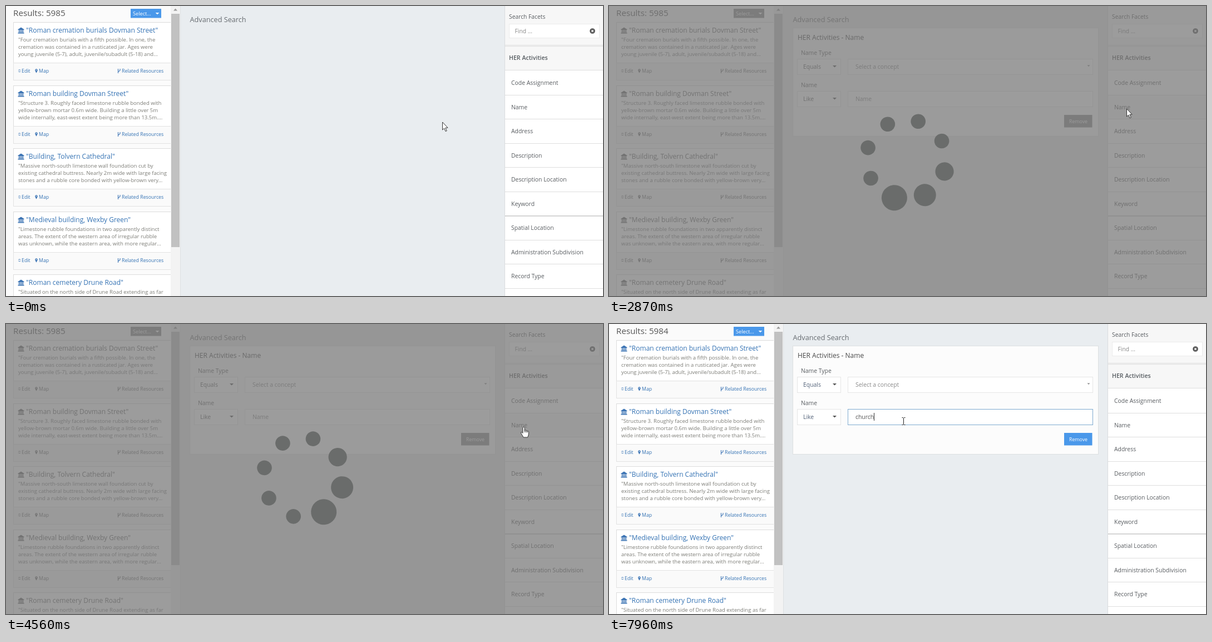
Animation of 1073 by 522 pixels, one loop 8 s. Source, as an HTML page:

```html
<!DOCTYPE html>
<html lang="en">
<head>
<meta charset="utf-8">
<title>Advanced search</title>
<style>
  html, body { margin: 0; width: 100%; height: 100%; overflow: hidden; }
  svg { display: block; width: 100%; height: 100%; font-family: "Open Sans", sans-serif; }
  text { white-space: pre; }
  .loading { filter: grayscale(1); }
</style>
</head>
<body>
<svg id="stage" viewBox="0 0 1073 522">
  <defs>
    <g id="museum" fill="#3c74b4">
      <path d="M0 3.6 5.5 0 11 3.6V4.4H0ZM0 9.4H11V11H0ZM.8 8.1H10.2V9H.8Z"/>
      <path d="M1.4 4.4H3.2V8.2H1.4ZM4.6 4.4H6.4V8.2H4.6ZM7.8 4.4H9.6V8.2H7.8Z"/>
    </g>
    <g id="links" fill="none" stroke="#3c74b4">
      <path d="M3.4 3V2H1.5Q.5 2 .5 3M.5 4.5Q.5 5.5 1.5 5.5H3.4V4.5" stroke-width=".9"/>
      <path d="M32.5 7.2 30.7 3.4A2 2 0 1 1 34.3 3.4Z" fill="#3c74b4" stroke-width=".6"/>
      <circle cx="32.5" cy="2.4" r=".8" fill="#fff" stroke="none"/>
      <path d="M179.5 0V8M183 0V2Q183 4 179.5 5" stroke-width="1.1"/>
    </g>
    <path id="arrow" d="M0 0V14L3.2 11.1 5.5 16.6 7.7 15.7 5.4 10.2H9.6Z"
      fill="#fff" stroke="#222" stroke-width=".9"/>
    <g id="hand" stroke="#222" stroke-width=".9">
      <path fill="#fff" d="M-1.6 1.5Q0-.6 1.6 1.5V6.4Q3.2 5.4 4 7 5.6 6.2 6.4 7.8 8.5 7.2 8.8 9.2V13Q8.5 16 7 19H-.5Q-2 16-4.8 11.6-5.5 9-3.2 9.8L-1.6 11.5Z"/>
      <path d="M1.6 6V10M4 7V10.2M6.4 8V10.6"/>
    </g>
    <path id="ibeam" d="M-3-6.5H-1L0-5.5 1-6.5H3M0-5.5V5.5M-3 6.5H-1L0 5.5 1 6.5H3" fill="none" stroke="#222"/>
  </defs>
  <g id="page"></g>
  <g id="mask">
    <rect width="1073" height="522" fill="#777" opacity=".72"/>
    <g id="spinner" fill="#6a6c6b"></g>
  </g>
  <use id="cursor"/>
</svg>
<script>
const $ = id => document.getElementById(id);
const clamp = v => Math.max(0, Math.min(1, v));
const BLUE = '#3573b4', GREY = '#595d61';

const text = (x, y, size, content, fill = GREY, extra = '') =>
  `<text x="${x}" y="${y}" font-size="${size}" fill="${fill}" ${extra}>${content}</text>`;
const rect = (x, y, w, h, fill, extra = '') =>
  `<rect x="${x}" y="${y}" width="${w}" height="${h}" fill="${fill}" ${extra}/>`;
const box = (x, y, w, h, fill, stroke, extra = '') =>
  rect(x + .5, y + .5, w, h, fill, `stroke="${stroke}" ${extra}`);
const caretDown = (x, y, r, fill) =>
  `<path d="M${x - r} ${y}h${2 * r}l${-r} ${r}Z" fill="${fill}"/>`;

const results = [
  ['Roman cremation burials Dovman Street',
    '"Four cremation burials with a fifth possible. In one, the',
    'cremation was contained in a rusticated jar. Ages were',
    'young juvenile (5-7), adult, juvenile/subadult (5-18) and...'],
  ['Roman building Dovman Street',
    '"Structure 3. Roughly faced limestone rubble bonded with',
    'yellow-brown mortar 0.6m wide. Building a little over 5m',
    'wide internally, east-west extent being more than 13.5m....'],
  ['Building, Tolvern Cathedral',
    '"Massive north-south limestone wall foundation cut by',
    'existing cathedral buttress. Nearly 2m wide with large facing',
    'stones and a rubble core bonded with yellow-brown very...'],
  ['Medieval building, Wexby Green',
    '"Limestone rubble foundations in two apparently distinct',
    'areas. The extent of the western area of irregular rubble',
    'was unknown, while the eastern area, with more regular...'],
  ['Roman cemetery Drune Road',
    '"Situated on the north side of Drune Road extending as far']
];
const facets = ['Code Assignment', 'Name', 'Address', 'Description', 'Description Location',
  'Keyword', 'Spatial Location', 'Administration Subdivision', 'Record Type'];

function card([title, ...lines], i) {
  const y = Math.round(29 + 113.5 * i);
  return box(13, y, 290, 104, '#fff', '#dcdcdc') +
    box(13, y + 73, 290, 31, '#fafafa', '#e2e2e2') +
    `<use href="#museum" x="21.5" y="${y + 9.5}"/>` +
    text(36, y + 19, 12, `"${title}"`, BLUE) +
    lines.map((line, n) => text(22, y + 35.3 + 12.7 * n, 9.55, line, '#7d7d77')).join('') +
    `<use href="#links" x="22" y="${y + 84}"/>` +
    text(28, y + 91, 8.8, 'Edit', BLUE) + text(59, y + 91, 8.8, 'Map', BLUE) +
    text(208, y + 91.3, 8.8, 'Related Resources', BLUE);
}

const resultList = rect(0, 0, 314, 522, '#fbfbfb') +
  text(13, 18, 15.2, '', '#555', 'id="count"') +
  rect(224, 5, 55, 16.5, '#4a98ea') + text(228, 17, 9.2, 'Select...', '#fff') +
  caretDown(272, 12, 3.3, '#fff') +
  results.map(card).join('') +
  rect(296, 0, 18, 522, '#f3f3f3') + rect(297, 14, 15, 420, '#c1c1c1') +
  '<path d="M301 8.5h7l-3.5-4Z" fill="#999"/>' + rect(313, 0, 1, 522, '#dde0e2');

const select = (y, label) => box(338, y, 78, 28, '#fff', '#e6e6e6') +
  text(349, y + 17.7, 10.4, label, '#55647a') + caretDown(405.5, y + 12, 3.5, '#555');

const form = `<g id="form">` +
  box(330, 39, 549, 195, '#fcfcfc', '#dcdfe1') +
  text(339, 61, 12, 'HER Activities - Name', '#484848') +
  text(345, 88, 10.4, 'Name Type') + select(95, 'Equals') +
  box(429, 95, 440, 28, '#fff', '#e6e6e6') + text(443, 112.7, 10.4, 'Select a concept', '#8b8b8b') +
  caretDown(862, 106.5, 2.5, '#888') +
  text(345, 146, 10.4, 'Name') + select(153, 'Like') +
  box(429, 153, 440, 28, '#fff', '#e6e6e6') +
  box(429, 153, 440, 28, 'none', '#7fabd0', 'id="focus"') +
  text(443, 170.7, 10.4, '', '', 'id="entry"') +
  rect(0, 160, 1, 14, '#333', 'id="caret"') +
  rect(818, 196, 50.5, 22.5, '#4a98ea') + text(827, 210.7, 8.8, 'Remove', '#fff') + '</g>';

const facetRow = (name, i) => {
  const y = 116 + 43.5 * i;
  return rect(897, Math.round(y + 43.5), 176, i === 5 ? 1.8 : 1, i === 5 ? '#d0d0d0' : '#dedede') +
    text(908, Math.round(y + 26.3), 10.4, name);
};
const facetPanel = rect(896, 0, 177, 522, '#fff') + rect(896, 0, 177, 115, '#f7f7f7') +
  text(904, 23, 10.3, 'Search Facets') +
  box(904, 32, 162, 25, '#fff', '#ebebeb') + text(914.5, 49, 10.3, 'Find ...', '#888') +
  '<circle cx="1054" cy="45" r="4.8" fill="#555"/>' +
  '<path d="M1052.3 43.3l3.4 3.4M1055.7 43.3l-3.4 3.4" stroke="#fff" stroke-width="1.3"/>' +
  rect(897, 70, 176, 1, '#dedede') + rect(897, 72, 176, 1, '#dedede') +
  text(904, 97, 10.6, 'HER Activities', '#555b60', 'font-weight="600"') +
  rect(897, 115, 176, 1, '#dedede') + rect(897, 161, 176, 42, '#f8f8f8', 'id="active"') +
  facets.map(facetRow).join('') + rect(896, 0, 1, 522, '#d9dcde');

$('page').innerHTML = rect(0, 0, 1073, 522, '#e9edf0') + resultList +
  text(330.5, 29, 12.7, 'Advanced Search', '#666b70') + form + facetPanel;

$('spinner').innerHTML = [23, 20, 16.6, 13.3, 13.3, 13.3, 13.3, 13.3].map((r, i) =>
  `<circle cx="72" r="${r}" transform="rotate(${-45 * i})"/>`).join('');

const show = (id, on) => $(id).setAttribute('display', on ? 'inline' : 'none');

// The pointer moves in discrete steps of about 73 ms.
function cursorAt(t) {
  if (t < 5480) {
    const linear = clamp((Math.floor((t - 690) / 71.25) + 1) / 9);
    const u = linear * linear * (3 - 2 * linear), v = 1 - u;
    const x = 784.5 * v * v + 2 * 880 * u * v + 930.5 * u * u;
    const y = 209 * v * v + 2 * 165 * u * v + 185 * u * u;
    const overLink = x > 896 && (t < 1660 || t >= 4560);
    return [overLink ? 'hand' : 'arrow', x, y];
  }
  const rest = 1 - clamp(Math.floor((t - 5480) / 72.8) / 7);
  return ['ibeam', 529.5 + 247 * rest * rest, 175 + 4.5 * rest * rest];
}

function draw(t) {
  const loading = t >= 2120 && t < 4630;
  $('count').textContent = 'Results: ' + (t < 4630 ? 5985 : 5984);
  $('page').classList.toggle('loading', loading);
  show('form', t >= 2120);
  show('active', t >= 2120 && t < 6380);
  show('mask', loading);

  const step = Math.floor((t - 2120) / 73.9);
  const angle = 327 + 14.03 * Math.min(step, 23) + 12.95 * Math.max(0, step - 23);
  $('spinner').setAttribute('transform', `translate(534.3 276.5) rotate(${angle})`);

  const typed = 'church'.slice(0, [7430, 7510, 7650, 7730, 7870, 7960].filter(key => t >= key).length);
  const entry = $('entry');
  entry.textContent = typed || 'Name';
  entry.setAttribute('fill', typed ? '#555' : '#8b8b8b');
  $('focus').setAttribute('opacity', clamp((t - 6380) / 360));
  show('caret', typed || (t >= 6380 && t < 6880));
  $('caret').setAttribute('x', Math.round(443 + (typed ? entry.getComputedTextLength() - .5 : 0)));

  const [shape, x, y] = cursorAt(t);
  $('cursor').setAttribute('href', '#' + shape);
  $('cursor').setAttribute('transform', `translate(${x} ${y})`);
}

function tick() {
  draw(performance.now() % 8000);
  requestAnimationFrame(tick);
}
tick();
</script>
</body>
</html>
```
